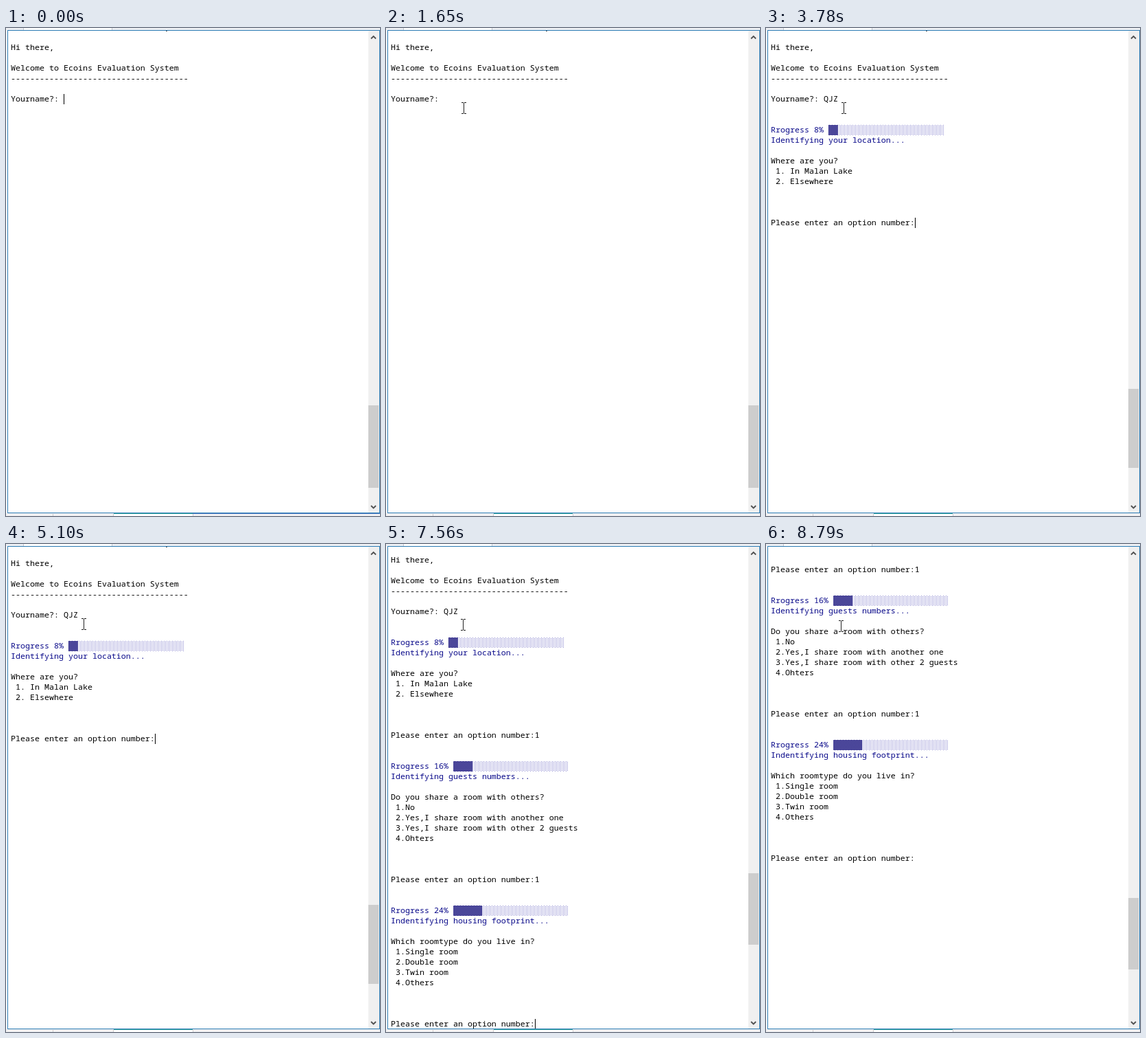
An HTML page with a canvas that plays this animation: 545x710 px, repeating every 8910 ms.

```html
<!DOCTYPE html>
<html lang="en">
<head>
<meta charset="utf-8">
<title>Console session</title>
<style>
html, body { margin: 0; width: 100%; height: 100%; overflow: hidden; background: #fff; }
canvas { display: block; }
</style>
</head>
<body>
<canvas id="stage" width="545" height="710"></canvas>
<script>
const ctx = document.getElementById('stage').getContext('2d');
const LOOP = 8910, TICK = 30, BLINK = 530;
const LEFT = 7, TOP = 21, CHAR = 7, LINE = 15;
const BLACK = '#000', NAVY = '#0a0a8a';
const PROMPT = 'Please enter an option number:';

// Each block is printed at its time: [row, text, filled cells of a bar]
const blocks = [
  { at: 0, rows: [
    [0, 'Hi there,'],
    [2, 'Welcome to Ecoins Evaluation System'],
    [3, '-'.repeat(37)]] },
  { at: 2640, rows: [
    [8, 'Rrogress 8% ', 2],
    [9, 'Identifying your location...', 0],
    [11, 'Where are you?'],
    [12, ' 1. In Malan Lake'],
    [13, ' 2. Elsewhere']] },
  { at: 5640, rows: [
    [20, 'Rrogress 16% ', 4],
    [21, 'Identifying guests numbers...', 0],
    [23, 'Do you share a room with others?'],
    [24, ' 1.No'],
    [25, ' 2.Yes,I share room with another one'],
    [26, ' 3.Yes,I share room with other 2 guests'],
    [27, ' 4.Ohters']] },
  { at: 7200, rows: [
    [34, 'Rrogress 24% ', 6],
    [35, 'Indentifying housing footprint...', 0],
    [37, 'Which roomtype do you live in?'],
    [38, ' 1.Single room'],
    [39, ' 2.Double room'],
    [40, ' 3.Twin room'],
    [41, ' 4.Others']] }
];

// Prompts and the times of the keys typed after them
const inputs = [
  { at: 0, row: 5, text: 'Yourname?: ', answer: 'QJZ', keys: [1950, 2250, 2460] },
  { at: 2640, row: 17, text: PROMPT, answer: '1', keys: [5340] },
  { at: 5640, row: 31, text: PROMPT, answer: '1', keys: [6990] },
  { at: 7200, row: 45, text: PROMPT, answer: '', keys: [] }
];

// [time, value, ...], held until the next entry
const scroll = [[0, 0], [7200, 5], [8130, 66], [8220, 126], [8430, 186], [8550, 246]];
const thumb = [[0, 549, 120], [2640, 525, 115], [5640, 501, 109], [7200, 479, 104]];
const mouse = [[900, 113, 116], [7230, 112, 117], [8130, 109, 119]];

const held = (steps, t) => steps.filter(s => s[0] <= t).pop();

function rect(color, x, y, w, h) {
  ctx.fillStyle = color;
  ctx.fillRect(x, y, w, h);
}

function shade(base, dot) {
  const tile = document.createElement('canvas');
  tile.width = 4;
  tile.height = 2;
  const g = tile.getContext('2d');
  g.fillStyle = base;
  g.fillRect(0, 0, 4, 2);
  g.fillStyle = dot;
  g.fillRect(0, 0, 1, 1);
  g.fillRect(2, 1, 1, 1);
  return ctx.createPattern(tile, 'repeat');
}
const light = shade('#fff', '#918ed2');
const dark = shade('#342f8a', '#8f8dc8');

function write(row, text, color) {
  ctx.fillStyle = color;
  ctx.fillText(text, LEFT, TOP + row * LINE + 11);
}

function bar(row, column, filled) {
  const x = LEFT + column * CHAR, y = TOP + row * LINE;
  rect(light, x, y, 24 * CHAR, LINE);
  rect(dark, x, y, filled * CHAR, LINE);
}

function drawConsole(t) {
  ctx.save();
  ctx.beginPath();
  ctx.rect(3, 4, 525, 701);
  ctx.clip();
  ctx.translate(0, -held(scroll, t)[1]);
  ctx.font = '11.6667px "Noto Sans Mono", "DejaVu Sans Mono", monospace';
  rect('#555', 233, 4, 2, 1);

  for (const block of blocks) {
    if (block.at > t) continue;
    for (const [row, text, filled] of block.rows) {
      write(row, text, filled === undefined ? BLACK : NAVY);
      if (filled) bar(row, text.length, filled);
    }
  }

  let caret;
  for (const input of inputs) {
    if (input.at > t) continue;
    const typed = input.keys.filter(k => k <= t);
    const text = input.text + input.answer.slice(0, typed.length);
    write(input.row, text, BLACK);
    caret = { row: input.row, column: text.length, since: typed.pop() || input.at };
  }
  if ((t - caret.since) % (2 * BLINK) < BLINK) {
    rect(BLACK, LEFT + caret.column * CHAR, TOP + caret.row * LINE, 1, LINE);
  }
  ctx.restore();
}

function chevron(y, dir) {
  ctx.strokeStyle = '#505050';
  ctx.lineWidth = 1.8;
  ctx.beginPath();
  ctx.moveTo(532, y + 2 * dir);
  ctx.lineTo(535.5, y - 1.5 * dir);
  ctx.lineTo(539, y + 2 * dir);
  ctx.stroke();
}

function drawScrollbar(t) {
  rect('#f0f0f0', 528, 4, 16, 701);
  const [, y, h] = held(thumb, t);
  const moved = Math.max(0, held(scroll, t)[1] - 6);
  rect('#cdcdcd', 528, Math.round(y + moved * 0.15), 15, h);
  chevron(13.5, 1);
  chevron(697, -1);
}

function drawFrame(t) {
  rect('#fff', 0, 0, 545, 710);
  rect('#eef0f4', 0, 0, 545, 3);
  rect('#fff', 26, 0, 128, 3);
  rect('#c4c6cc', 25, 0, 1, 3);
  rect('#c4c6cc', 154, 0, 1, 3);
  rect('#f0f0f2', 0, 706, 545, 4);
  rect('#fff', 157, 706, 115, 4);
  for (const x of [68, 156, 272]) rect('#c8c8cc', x, 707, 1, 3);
  ctx.strokeStyle = '#2b7bb4';
  ctx.lineWidth = 1;
  ctx.strokeRect(2.5, 3.5, 542, 702);
  rect('#2aa09a', 157, 706, 115, 1);
  if (t < TICK) rect('#4a78c0', 272, 706, 273, 1);
}

function drawMouse(t) {
  const at = held(mouse, t);
  if (!at) return;
  const [, x, y] = at;
  rect('#222', x, y - 7, 1, 15);
  for (const end of [y - 8, y + 8]) {
    rect('#222', x - 3, end, 3, 1);
    rect('#222', x + 1, end, 3, 1);
  }
}

function draw(now) {
  const t = Math.floor((now % LOOP) / TICK) * TICK;
  drawFrame(t);
  drawConsole(t);
  drawScrollbar(t);
  drawMouse(t);
}

const start = performance.now();
function loop() {
  draw(performance.now() - start);
  requestAnimationFrame(loop);
}
loop();
</script>
</body>
</html>
```
